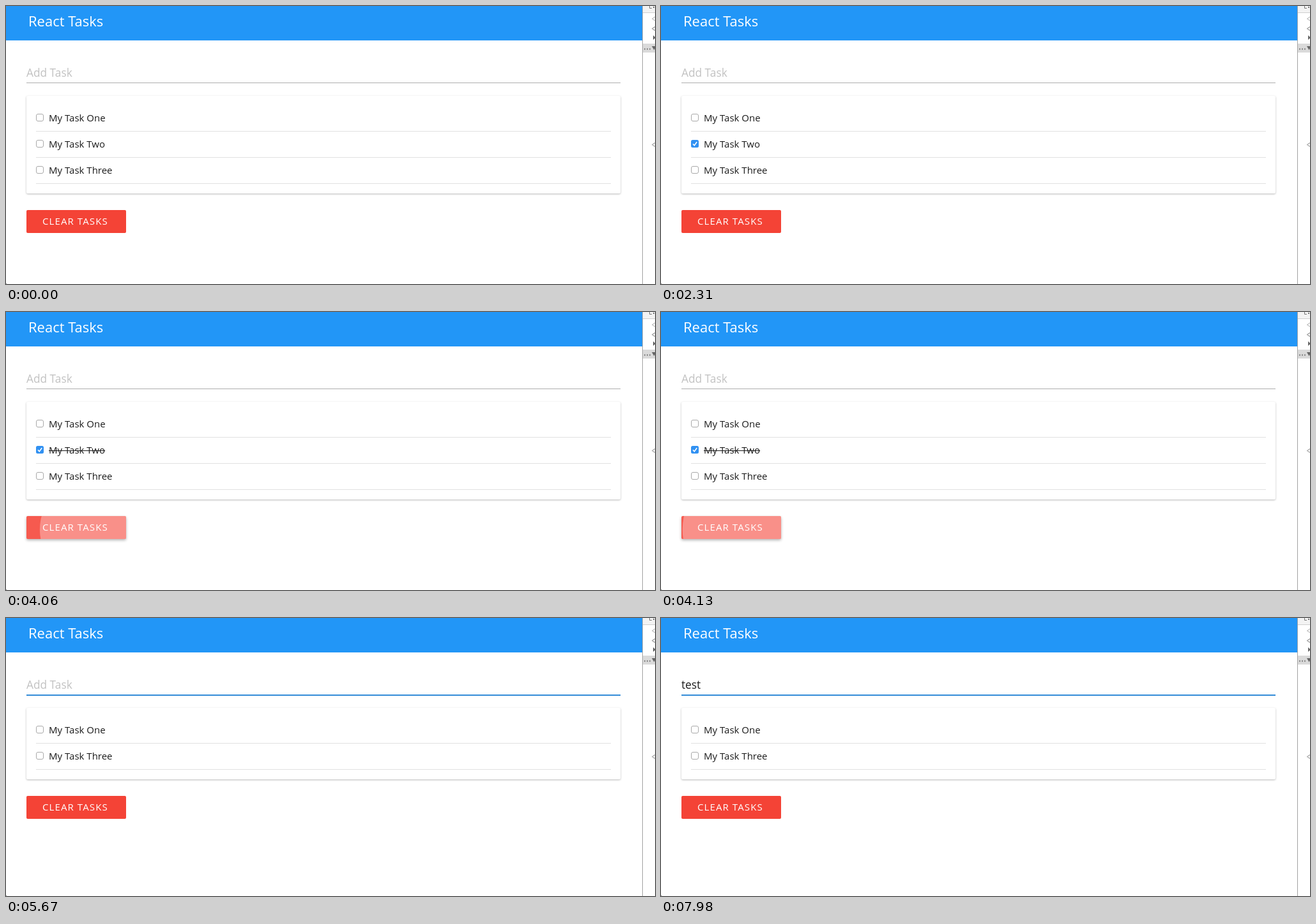
An HTML page with a canvas for the animation above (8000 ms loop, 1016 by 436 pixels).

```html
<!DOCTYPE html>
<html lang="en">
<head>
<meta charset="utf-8">
<title>React Tasks</title>
<style>
html, body { margin: 0; width: 100%; height: 100%; overflow: hidden; background: #fff; }
canvas { display: block; width: 1016px; height: 436px; }
</style>
</head>
<body>
<canvas id="stage"></canvas>
<script>
const W = 1016, H = 436, LOOP = 8000, STEP = 70;
const INK = '#1c1c1c', BLUE = '#2296f7';
const canvas = document.getElementById('stage');
const ctx = canvas.getContext('2d');
const dpr = window.devicePixelRatio || 1;
canvas.width = W * dpr;
canvas.height = H * dpr;

const clamp = v => Math.min(1, Math.max(0, v));
const easeOut = v => 1 - (1 - v) ** 2;
const ramp = (t, start, length) => easeOut(clamp((t - start) / length));
const mix = (a, b, k) => `rgb(${a.map((v, i) => Math.round(v + (b[i] - v) * k))})`;

function rect(x, y, w, h, color) {
  ctx.fillStyle = color;
  ctx.fillRect(x, y, w, h);
}

function roundRect(x, y, w, h, r) {
  ctx.beginPath();
  ctx.roundRect(x, y, w, h, r);
}

function text(str, x, y, size, color, weight = 400, spacing = 0) {
  ctx.font = `${weight} ${size}px "Open Sans", "Noto Sans", sans-serif`;
  ctx.letterSpacing = spacing + 'px';
  ctx.fillStyle = color;
  ctx.fillText(str, x, y);
}

function polyline(points, color, width) {
  ctx.beginPath();
  points.forEach(([x, y]) => ctx.lineTo(x, y));
  ctx.strokeStyle = color;
  ctx.lineWidth = width;
  ctx.stroke();
}

function shadow(alpha, blur, dy) {
  ctx.shadowColor = `rgba(0,0,0,${alpha})`;
  ctx.shadowBlur = blur * dpr;
  ctx.shadowOffsetY = dy * dpr;
}

function checkbox(x, y, on) {
  if (on) {
    roundRect(x, y, 12, 12, 2.5);
    ctx.fillStyle = '#3191f2';
    ctx.fill();
    polyline([[x + 3, y + 6.3], [x + 5.2, y + 8.8], [x + 9.2, y + 3.2]], '#fff', 1.6);
  } else {
    roundRect(x + 0.5, y + 0.5, 11, 11, 2.5);
    ctx.fillStyle = '#fff';
    ctx.fill();
    ctx.strokeStyle = '#a9a9a9';
    ctx.lineWidth = 1;
    ctx.stroke();
  }
}

function field(value, focus) {
  text(value || 'Add Task', 32, 111, 17.3, value ? INK : '#c2c2c2');
  rect(32, 120, 930, 1, mix([174, 174, 174], [50, 139, 215], focus));
  if (focus > 0) rect(32, 121, 930, 1, `rgba(50,139,215,${focus})`);
}

function card(tasks) {
  const h = 31 + tasks.length * 41;
  ctx.save();
  shadow(0.28, 3, 1);
  roundRect(32, 141, 930, h - 1, 2);
  ctx.fillStyle = '#fff';
  ctx.fill();
  ctx.restore();
  tasks.forEach((task, i) => {
    const y = 169 + i * 41;
    checkbox(47, y, task.on);
    text(task.name, 67, y + 12, 15, INK);
    if (task.struck) rect(67, y + 47 - 0 - 0 - 0 - 0 - 0 - 0 - 0 - 0 - 0 - 0 - 0 - 0 - 0 - 0 - 0 - 0 - 0 - 0 - 0 - 0 - 0 - 40, ctx.measureText(task.name).width, 1, INK);
    rect(47, y + 27, 900, 1, '#e1e1e1');
  });
}

function button(y, hover, ripple) {
  ctx.save();
  shadow(0.3 * hover, 4, 2);
  roundRect(32, y, 156, 36, 2);
  ctx.fillStyle = mix([244, 67, 54], [246, 90, 79], hover);
  ctx.fill();
  ctx.restore();
  if (ripple.alpha > 0) {
    ctx.save();
    roundRect(32, y, 156, 36, 2);
    ctx.clip();
    ctx.beginPath();
    ctx.arc(131, y + 21, ripple.radius, 0, Math.PI * 2);
    ctx.fillStyle = `rgba(255,255,255,${ripple.alpha})`;
    ctx.fill();
    ctx.restore();
  }
  text('CLEAR TASKS', 57, y + 23, 15, '#fff', 500, 1.1);
}

function sidePanel() {
  rect(996, 0, 20, H, '#fff');
  rect(997, 0, 19, 10, '#f3f3f3');
  rect(997, 10, 19, 1, '#cfcfcf');
  polyline([[1007.5, 0], [1007.5, 3.5], [1011, 3.5]], '#777', 1);
  rect(1013, 1, 2, 2, '#777');
  rect(997, 59, 19, 14, '#dadada');
  for (const x of [999, 1003, 1007]) rect(x, 66.5, 2, 2, '#808080');
  [[20, '#aaa'], [35.5, '#777'], [217.5, '#888']].forEach(([y, c]) =>
    polyline([[1016, y - 3], [1011.5, y], [1016, y + 3]], c, 1));
  ctx.fillStyle = '#666';
  ctx.beginPath();
  ctx.moveTo(1013, 46);
  ctx.lineTo(1017, 49.5);
  ctx.lineTo(1013, 53);
  ctx.moveTo(1011, 63);
  ctx.lineTo(1018, 63);
  ctx.lineTo(1014.5, 69);
  ctx.fill();
  rect(996, 0, 1, H, '#a3a3a3');
}

function draw(t) {
  ctx.setTransform(dpr, 0, 0, dpr, 0, 0);
  rect(0, 0, W, H, '#fff');
  rect(0, 0, 996, 54, BLUE);
  text('React Tasks', 35, 32, 22, '#fff', 500);

  const typed = [6650, 6740, 6840, 6930].filter(at => t >= at).length;
  field('test'.slice(0, typed), ramp(t, 5300, 300));

  const cleared = t >= 4410;
  const tasks = [
    { name: 'My Task One' },
    { name: 'My Task Two', on: t >= 2030, struck: t >= 2520 },
    { name: 'My Task Three' }
  ].filter(task => !(cleared && task.on));
  card(tasks);

  const hover = ramp(t, 3220, 250) - ramp(t, 5000, 300)
    + ramp(t, 6860, 250) - ramp(t, 7330, 300);
  const ripple = {
    radius: 156 * ramp(t, 3840, 750),
    alpha: t < 3840 ? 0 : 0.33 * (1 - ramp(t, 4270, 560))
  };
  button(cleared ? 279 : 320, clamp(hover), ripple);
  sidePanel();
  rect(0, 435, 1, 1, '#777');
}

const begin = performance.now();
function tick() {
  const t = Math.max(0, performance.now() - begin) % LOOP;
  draw(Math.floor(t / STEP) * STEP);
  requestAnimationFrame(tick);
}
tick();
</script>
</body>
</html>
```
